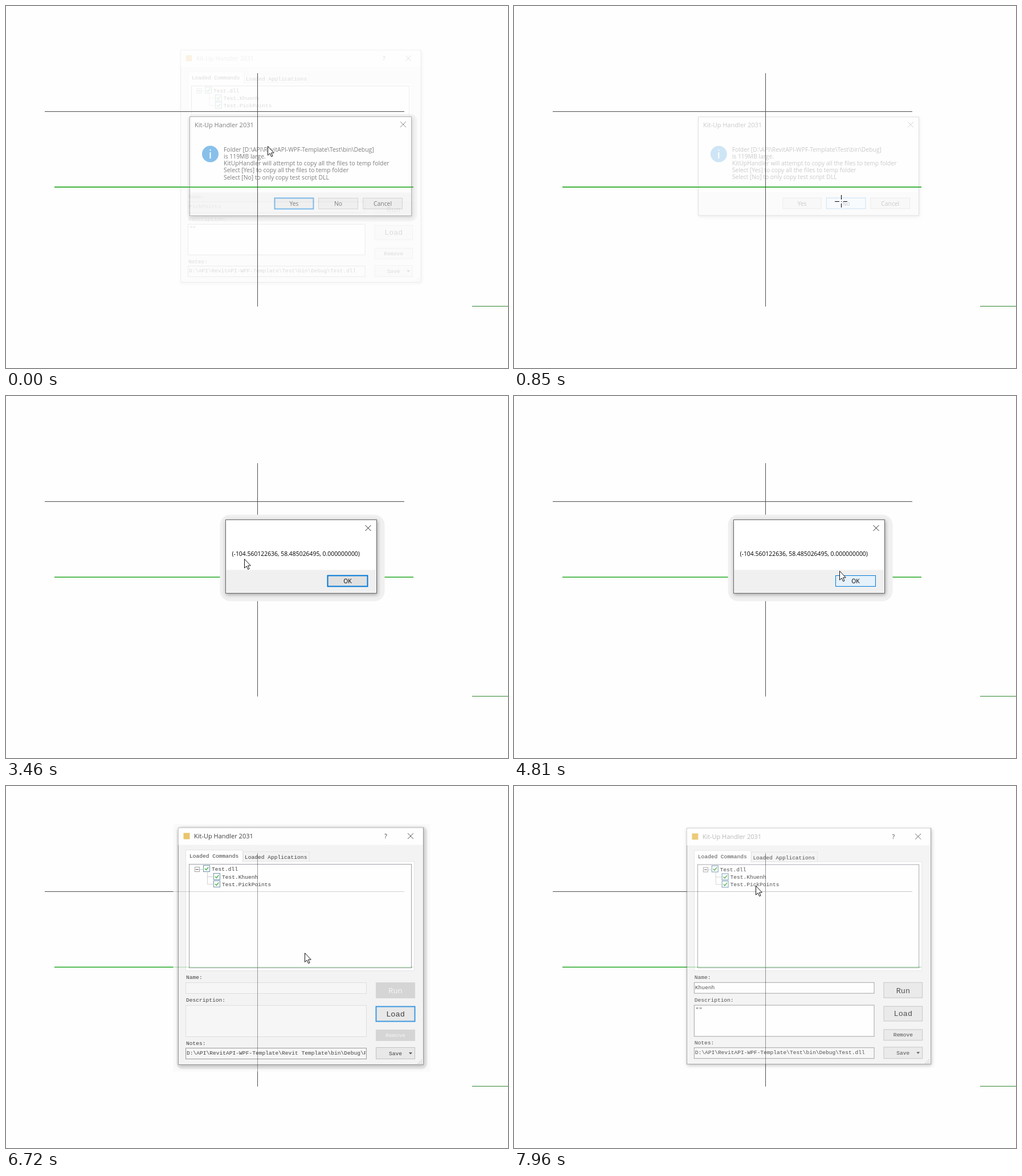
An HTML page for the animation above (8 s loop, 881 by 636 pixels).

```html
<!DOCTYPE html>
<html lang="en">
<head>
<meta charset="utf-8">
<title>Pick points</title>
<style>
html, body { margin: 0; width: 100%; height: 100%; overflow: hidden; background: #fefefe; }
svg { display: block; width: 881px; height: 636px; }
text { font: 10.4px "Open Sans", sans-serif; fill: #000; white-space: pre; }
text.title { font-size: 11px; }
text.mono { font: 9.6px "Liberation Mono", monospace; }
text.large { font-size: 13.6px; }
text.mid { text-anchor: middle; }
.frame { filter: drop-shadow(1px 2px 3px #0005); }
.stroke { fill: none; stroke: #222; }
</style>
</head>
<body>
<svg viewBox="0 0 881 636">
  <defs>
    <path id="vertical" d="M441.5 118V528" stroke="#4d4d4d"/>
    <g id="level">
      <path d="M68 185.5H699" stroke="#4d4d4d"/>
      <path d="M85 317.5H715" stroke="#2fb02f" stroke-opacity=".5"/>
      <path d="M85 318.5H715" stroke="#1ea51e"/>
    </g>
    <clipPath id="notesClip"><rect x="316" y="461" width="315" height="18"/></clipPath>
  </defs>
  <path d="M818 527.5H881" stroke="#2d852d"/>
  <use href="#level"/>
  <use href="#vertical"/>
  <path id="greenHover" d="M85 318H715" stroke="#2558b8" stroke-width="2"/>
  <path id="verticalHover" d="M441.3 118V528" stroke="#2558b8" stroke-width="2.2"/>
  <rect id="ghost" x="375.5" y="208.5" width="288" height="152" fill="none" stroke="#f5f5f5" stroke-width="2"/>
  <g id="manager"></g>
  <g id="question"></g>
  <g id="result"></g>
  <use id="levelOver" href="#level"/>
  <use id="verticalOver" href="#vertical"/>
  <path id="arrow" d="M.5 .5V16.3L4.1 12.9L6.6 18.6L9 17.6L6.5 12H11.3Z" fill="#fff" stroke="#111"/>
  <path id="cross" d="M-11 .5H-3M4 .5H11M.5 -11V-3M.5 4V11M0 .5H1" stroke="#000" fill="none"/>
</svg>
<script>
const LOOP = 8000;
const APP = 'Kit-Up Handler 2031';
const COMMAND = 'Khuenh';
const ROOT = 'D:\\API\\RevitAPI-WPF-Template\\';
const $ = id => document.getElementById(id);

// Markup helpers; boxes are given by their edges.
const box = (l, t, r, b, fill, stroke = 'none', extra = '') =>
  `<rect x="${l + .5}" y="${t + .5}" width="${r - l - 1}" height="${b - t - 1}" fill="${fill}" stroke="${stroke}" ${extra}/>`;
const label = (x, y, text, cls = '', extra = '') => `<text x="${x}" y="${y}" class="${cls}" ${extra}>${text}</text>`;
const line = (d, extra = '') => `<path d="${d}" class="stroke" ${extra}/>`;
const closeMark = (x, y) => line(`M${x - 5} ${y - 5}l10 10m0 -10l-10 10`);
const button = (id, l, t, r, b, text, cls = '', drop = 4) =>
  box(l, t, r, b, '#e1e1e1', '#adadad', `id="${id}"`) +
  label((l + r) / 2, (t + b) / 2 + drop, text, 'mid ' + cls, `id="${id}Text"`);
const check = (x, y) => box(x, y, x + 12, y + 12, '#fff', '#3e6f93') +
  line(`M${x + 3} ${y + 6}l2.3 2.5l4 -5`, 'style="stroke:#21a121;stroke-width:1.6"');

$('manager').innerHTML =
  `<g id="managerHalo">${box(293, 66, 745, 502, '#f9f9f9')}${box(299, 70, 740, 498, '#e6e6e6', 'none', 'rx="10"')}</g>` +
  box(302, 73, 733, 490, '#f0f0f0', '#777', 'class="frame"') +
  box(302, 73, 732, 104, '#fff') +
  box(311, 82, 323, 94, '#e3b23c') +
  label(330, 92, APP, 'title', 'id="managerTitle"') +
  label(664, 92, '?', 'title') + closeMark(710, 88) +
  box(315, 132, 717, 325, '#fff', '#ddd') +
  box(416, 115, 533, 133, '#f0f0f0', '#ddd') +
  box(315, 112, 416, 134, '#fff', '#ddd') + box(316, 130, 415, 136, '#fff') +
  label(322, 126, 'Loaded Commands', 'mono') +
  label(419, 128, 'Loaded Applications', 'mono') +
  box(321, 137, 712, 320, '#fff', '#7d818a') +
  line('M340 146.5H346M353.5 152V172.5M354 159.5H364M354 172.5H364', 'stroke-dasharray="1 1" style="stroke:#888"') +
  box(331, 142, 340, 151, '#fff', '#888') + line('M333 146.5h5') +
  check(346, 139) + check(364, 153) + check(364, 166) +
  box(378, 153, 445, 166, '#0078d7', 'none', 'id="selection"') +
  label(361, 149, 'Test.dll', 'mono') +
  label(379, 163, 'Test.' + COMMAND, 'mono', 'id="commandRow"') +
  label(379, 176, 'Test.PickPoints', 'mono') +
  label(316, 339, 'Name:', 'mono') + box(315, 345, 633, 365, '#fff', '#7a7a7a', 'id="nameBox"') +
  label(317, 357, '', 'mono', 'id="name"') +
  label(316, 379, 'Description:', 'mono') + box(315, 385, 633, 441, '#fff', '#7a7a7a', 'id="aboutBox"') +
  label(318, 396, '""', 'mono', 'id="about"') +
  label(316, 455, 'Notes:', 'mono') + box(315, 460, 633, 480, '#f4f4f4', '#7a7a7a') +
  `<g clip-path="url(#notesClip)">${label(317, 472, '', 'mono', 'id="notes"')}</g>` +
  button('run', 649, 345, 718, 373, 'Run', 'mono large', 5) +
  button('load', 649, 387, 718, 414, 'Load', 'mono large') +
  button('remove', 649, 428, 718, 448, 'Remove', 'mono', 3) +
  button('save', 649, 459, 718, 480, 'Save', 'mono', 3) +
  '<path d="M707 468h6l-3 3.5z" fill="#222"/>' +
  line('M722 487.5H731M725 484.5H731M728 481.5H731', 'stroke-dasharray="2 1" style="stroke:#aaa"');

$('question').innerHTML =
  box(318, 189, 722, 379, '#ededed', 'none', 'rx="12" id="questionHalo"') +
  box(322, 194, 712, 369, '#fff', '#666', 'class="frame"') +
  box(323, 327, 711, 368, '#f0f0f0') +
  label(331, 213, APP, 'title') + closeMark(697, 208) +
  '<circle cx="358.500" cy="260" r="14.500" fill="#1583d8"/>' +
  '<path d="M358.500 252v2.200M358.500 257v11" stroke="#fff" stroke-width="2"/>' +
  [`Folder [${ROOT}Test\\bin\\Debug]`, 'is 119MB large.',
    'KitUpHandler will attempt to copy all the files to temp folder',
    'Select [Yes] to copy all the files to temp folder',
    'Select [No] to only copy test script DLL'
  ].map((text, i) => label(382, 255.5 + i * 12.25, text)).join('') +
  button('yes', 471, 337, 540, 357, 'Yes') +
  button('no', 548, 337, 618, 357, 'No') +
  button('cancel', 626, 337, 696, 357, 'Cancel');

$('result').innerHTML =
  box(375, 208, 665, 361, '#f0f0f0', 'none', 'rx="18" id="resultHalo"') +
  box(385, 217, 651, 347, '#fff', '#666', 'class="frame"') +
  box(386, 305, 650, 346, '#f0f0f0') + closeMark(635.5, 232) +
  label(396.5, 280.5, '(-104.560122636, 58.485026495, 0.000000000)') +
  button('ok', 564, 315, 635, 335, 'OK');

// The picture advances in bursts: [first change, last change, number of changes].
const ticks = [0];
for (const [from, to, count] of [[120, 1120, 8], [1250, 1790, 5], [2200, 3170, 8], [3320, 4260, 8],
  [4400, 4950, 5], [5260, 5720, 4], [6720, 7690, 8], [7960, 7960, 1]])
  for (let i = 0; i < count; i++) ticks.push(from + (to - from) * i / Math.max(1, count - 1));

// Keys: time, opacity, scale, halo shown.
const fades = {
  manager: { centre: [517, 281], keys: [[0, .13, .98, 0], [120, 0, .98, 0], [6720, .75, 1, 1], [6850, 1, 1.003, 1], [7960, .68, .996, 0]] },
  question: { centre: [517, 281], keys: [[0, .5, 1, 1], [120, 1, 1.003, 1], [830, .2, .995, 0], [970, 0, .99, 0]] },
  result: { centre: [518, 282], keys: [[0, 0, .95, 0], [2330, .4, .96, 0], [2470, 1, 1, 1], [5400, .3, .98, 0], [5560, 0, .95, 0]] }
};
const path = [[0, 459, 246], [120, 459, 246], [690, 578, 345], [834, 574, 343], [977, 570, 338], [1120, 545, 320],
  [1520, 460, 317], [1655, 443, 318], [1790, 441, 319], [2340, 441, 319], [3170, 416, 288], [3320, 412, 288], [3454, 418, 286],
  [3990, 583, 285], [4260, 494, 274], [4400, 512, 280], [4812, 600, 321], [5260, 598, 320], [5720, 525, 295],
  [6720, 524, 293], [6859, 522, 288], [7410, 424, 160], [7690, 424, 160], [7960, 424, 175]];

const hold = (keys, t) => keys.findLast(key => key[0] <= t);
function glide(keys, t) {
  const a = hold(keys, t), b = keys[keys.indexOf(a) + 1] || a;
  const u = b === a ? 0 : (t - a[0]) / (b[0] - a[0]);
  return [1, 2].map(i => a[i] + (b[i] - a[i]) * u);
}
const set = (id, attrs) => { for (const k in attrs) $(id).setAttribute(k, attrs[k]); };
const show = (id, on) => set(id, { opacity: +on });
const paint = (id, state) => set(id, {
  normal: { fill: '#e1e1e1', stroke: '#adadad', 'stroke-width': 1 },
  focus: { fill: '#e1e1e1', stroke: '#0078d7', 'stroke-width': 2 },
  hover: { fill: '#e5f1fb', stroke: '#0078d7', 'stroke-width': 1 },
  off: { fill: '#c8c8c8', stroke: '#c8c8c8', 'stroke-width': 1 }
}[state]);

function draw(t) {
  for (const id in fades) {
    const { centre: [x, y], keys } = fades[id], [, opacity, scale, halo] = hold(keys, t);
    set(id, { opacity, transform: `translate(${x} ${y}) scale(${scale}) translate(${-x} ${-y})` });
    show(id + 'Halo', halo);
  }

  const reopened = t >= 6720, chosen = !reopened || t >= 7550;
  $('name').textContent = !reopened ? 'PickPoints' : chosen ? COMMAND : '';
  $('notes').textContent = ROOT + (chosen ? 'Test\\bin\\Debug\\Test.dll' : 'Revit Template\\bin\\Debug\\Revit');
  show('about', chosen);
  for (const id of ['nameBox', 'aboutBox'])
    set(id, { fill: chosen ? '#fff' : '#f4f4f4', stroke: chosen ? '#7a7a7a' : '#d4d4d4' });
  for (const id of ['run', 'remove']) {
    paint(id, chosen ? 'normal' : 'off');
    $(id + 'Text').style.fill = chosen ? '#000' : '#f2f2f2';
  }
  paint('load', chosen ? 'normal' : 'focus');
  const selected = t >= 7550 && t < 7960;
  show('selection', selected);
  $('commandRow').style.fill = selected ? '#fff' : '#000';
  $('managerTitle').style.fill = t >= 7960 || !reopened ? '#999' : '#000';

  const overNo = t >= 540;
  paint('yes', overNo ? 'normal' : 'focus');
  paint('no', overNo ? 'hover' : 'normal');
  paint('ok', t >= 4670 && t < 5260 ? 'hover' : 'focus');
  if (t < 4670 || t >= 5260) set('ok', { 'stroke-width': 2 });

  show('greenHover', t >= 1120 && t < 1520);
  show('verticalHover', t >= 1650 && t < 2330);
  show('ghost', t >= 5560 && t < 6720);
  const through = t < 120 || t >= 830 && t < 1120;
  show('levelOver', through);
  set('verticalOver', { opacity: through ? 1 : t >= 7960 || reopened && t < 6850 ? .4 : 0 });

  const crossing = t >= 830 && t < 2330, [x, y] = glide(path, t).map(Math.round);
  for (const id of ['arrow', 'cross']) set(id, { transform: `translate(${x} ${y})` });
  show('cross', crossing);
  show('arrow', !crossing);
}

function tick() {
  const now = performance.now() % LOOP;
  draw(ticks.findLast(time => time <= now));
  requestAnimationFrame(tick);
}
tick();
</script>
</body>
</html>
```
